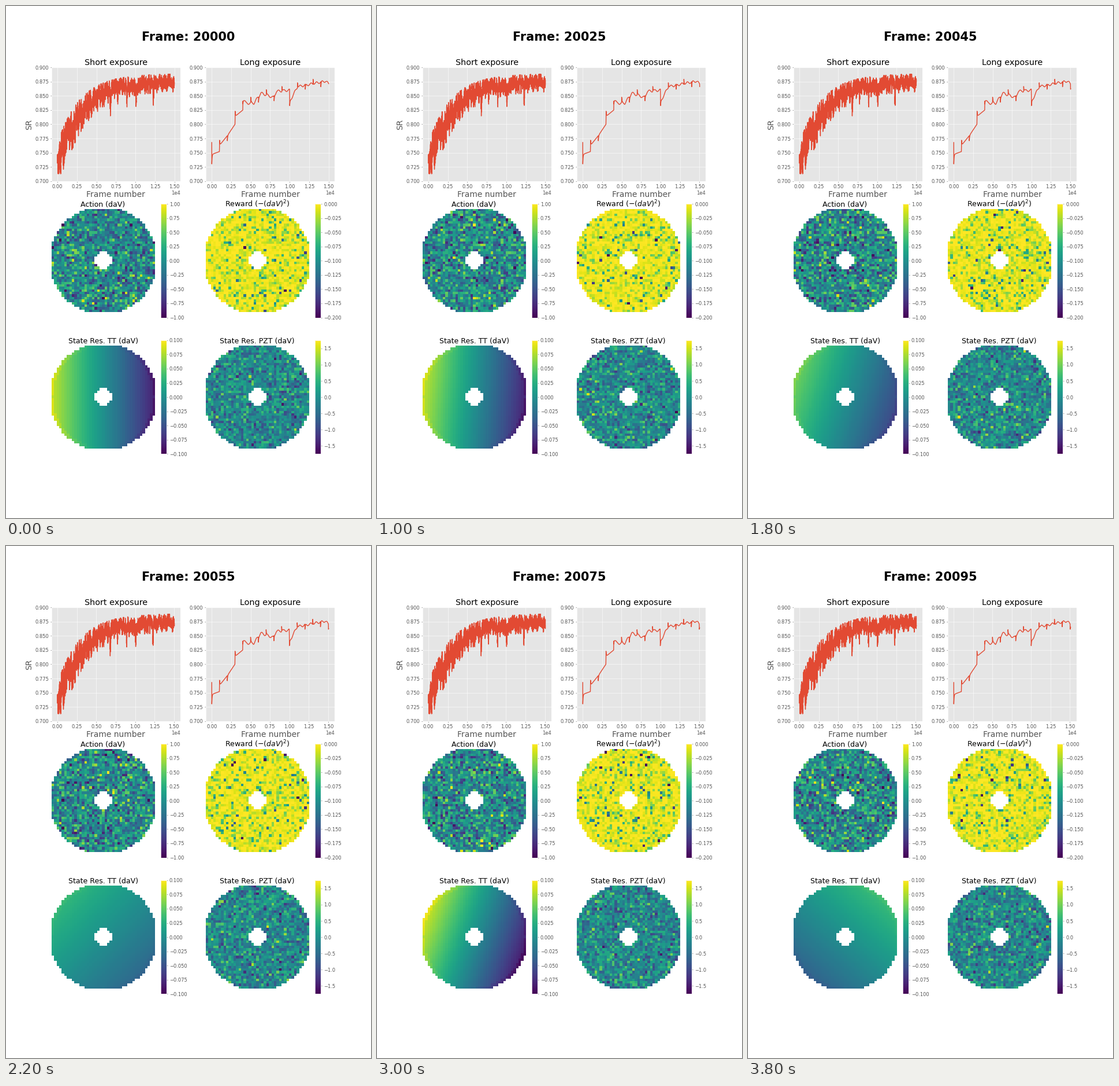
A matplotlib script for the animation above (4 s loop, 632 by 885 pixels).

```python
import numpy as np
import matplotlib.pyplot as plt
from matplotlib.animation import FuncAnimation

W, H, DPI = 632, 885, 50
FRAMES, INTERVAL = 20, 200
N0, STEP = 15000, 5
CELLS = 41

plt.style.use("ggplot")
plt.rcParams.update({
    "font.family": "DejaVu Sans",
    "font.size": 12,
    "figure.facecolor": "white",
    "xtick.labelsize": "medium",
    "ytick.labelsize": "medium",
    "axes.labelsize": 20,
    "axes.titlesize": "xx-large",
    "image.cmap": "viridis",
    "lines.linewidth": 2,
})

# Ring-shaped pupil on a square grid
c = np.arange(CELLS) - CELLS // 2
X, Y = np.meshgrid(c, c)
R2 = X**2 + Y**2
OUTSIDE = (R2 > 455) | (R2 < 10.5)
RIM = 1 + 0.12 * (R2 > 400)

# Tip-tilt poses: (step, slope to the right, slope downwards)
POSES = np.array([
    (0, -.080, .000), (3, -.078, -.003), (7, -.079, -.012), (11, -.022, -.021),
    (15, -.077, -.028), (17, -.013, .077), (19, .022, -.026),
]).T

# Trend of the long exposure: (thousands of steps, level)
TREND = np.array([
    (0, .747), (.98, .752), (1, .763), (2, .780), (2.98, .800), (3, .814),
    (3.98, .825), (4, .846), (4.4, .837), (5.4, .837), (6.3, .855), (7.9, .847),
    (8.3, .858), (9.98, .860), (10, .840), (11, .866), (14.6, .876),
    (15.02, .871), (15.03, .862), (15.1, .867),
]).T

x = np.arange(0, N0 + STEP * FRAMES, STEP)
k = x / 1000


def short_series():
    """Noise inside a rising, narrowing band with a few sharp drops."""
    rng = np.random.default_rng(4)
    top = .888 - .125 * np.exp(-k / 2.9)
    gap = (.026 + .055 * np.exp(-k / 3.5)) * (1 - .4 * np.exp(-k / .2))
    slow = np.convolve(rng.normal(size=x.size), np.ones(24) / 24 ** .5, "same")
    noise = np.clip(rng.normal(0, .42, x.size) + .35 * slow, -1.3, 1.08)
    y = top - gap / 2 * (1 - noise)
    for at in (6.8, 7.75, 8.9, 10.1, 12.3):
        y -= .027 * np.exp(-((k - at) / .05) ** 2)
    return np.maximum(y, .713)


def long_series():
    """Running mean that restarts, with a spike, every thousand steps."""
    part = np.minimum(np.floor(k), 14)
    sign = np.where(part % 2, 1, -1)
    size = np.where(part, .009, .019)
    y = np.interp(k, *TREND) + sign * size * np.exp(-(k - part) / .04)
    y += .002 * np.sin(k * 9) * (k > 4)
    y[0] = .768
    return y


def maps(i):
    """Action, reward, tip-tilt and residual maps of one step."""
    rng = np.random.default_rng([7, i])
    shape = (CELLS, CELLS)
    action = rng.normal(-.04, .34, shape)
    error = rng.normal(0, .125, shape) * rng.uniform(.5, 1.5, shape)
    residual = rng.normal(-.1, .46, shape)
    gx, gy = (np.interp(i, POSES[0], slope) for slope in POSES[1:])
    tilt = (gx * X + gy * Y) / c[-1] * RIM
    return [np.ma.array(m, mask=OUTSIDE) for m in (action, -error**2, tilt, residual)]


fig, axes = plt.subplots(3, 2, figsize=(W / DPI, H / DPI), dpi=DPI)
fig.subplots_adjust(left=.125, right=.9, bottom=.125, top=.88, wspace=.2, hspace=.2)
heading = fig.suptitle("", y=.95, fontsize=30, fontweight="bold")

series = [short_series(), long_series()]
lines = []
for ax, title in zip(axes[0], ("Short exposure", "Long exposure")):
    ax.set_title(title)
    ax.set_xlabel("Frame number")
    ax.set_ylim(.7, .9)
    ax.ticklabel_format(style="sci", axis="x", scilimits=(0, 0))
    lines += ax.plot([], [])
axes[0, 0].set_ylabel("SR")

panels = [
    ("Action (daV)", -1, 1),
    ("Reward ($-(daV)^2$)", -.2, 0),
    ("State Res. TT (daV)", -.1, .1),
    ("State Res. PZT (daV)", -1.75, 1.75),
]
images = []
for ax, (title, lo, hi), data in zip(axes[1:].flat, panels, maps(0)):
    im = ax.imshow(data, vmin=lo, vmax=hi, interpolation="nearest")
    ax.set_title(title, fontsize=18)
    ax.axis("off")
    fig.colorbar(im, ax=ax)
    images.append(im)


def draw(i):
    n = N0 + STEP * i
    heading.set_text(f"Frame: {20000 + STEP * i}")
    for ax, line, y in zip(axes[0], lines, series):
        line.set_data(x[x <= n], y[x <= n])
        ax.set_xlim(-.05 * n, 1.05 * n)
    for im, data in zip(images, maps(i)):
        im.set_data(data)
    return [heading, *lines, *images]


anim = FuncAnimation(fig, draw, frames=FRAMES, interval=INTERVAL,
                     repeat=True, repeat_delay=0, blit=False)
plt.show()
```
